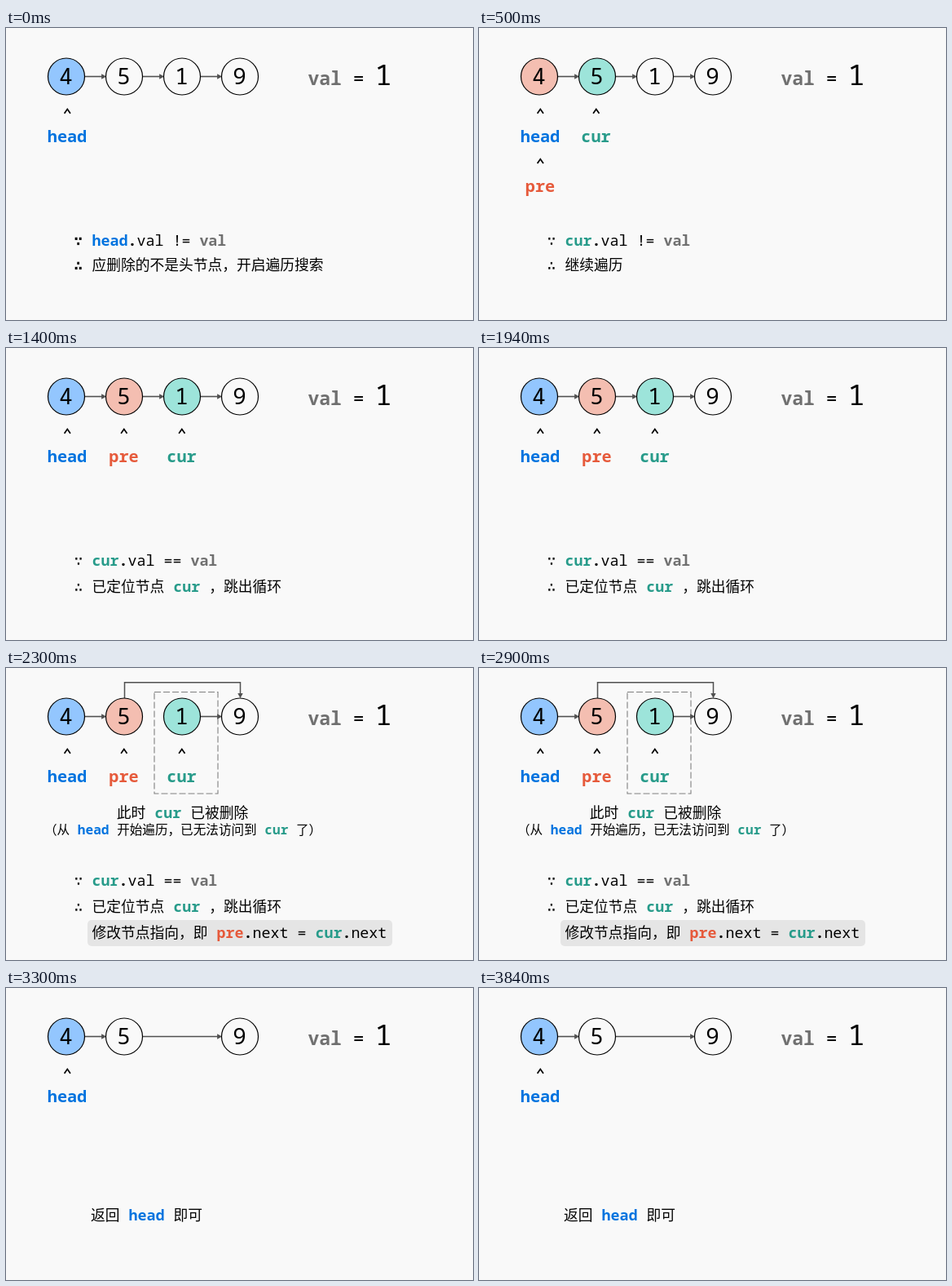
An HTML page that plays this animation: 573 px wide and 358 px high, repeating every 4200 ms.

```html
<!DOCTYPE html>
<html lang="zh-CN">
<head>
<meta charset="utf-8">
<title>链表删除节点</title>
<style>
html, body { margin: 0; width: 100%; height: 100%; overflow: hidden; background: #f9f9f9; }
svg { display: block; width: 100vw; height: 100vh; }
text { font-family: "Noto Sans Mono", "Noto Sans CJK SC", "Noto Sans CJK", monospace; white-space: pre; fill: #000; }
.cjk { font-family: "Noto Sans CJK SC", "Noto Sans CJK", sans-serif; font-weight: 500; }
.sign { font-family: "DejaVu Sans Mono", "DejaVu Sans", monospace; }
.strong .sign { font-weight: 700; }
.digit { font-weight: 500; }
.head, .cur, .pre, .val, .dot { font-weight: 700; }
.head { fill: #0073df; }
.cur { fill: #279b8a; }
.pre { fill: #e65a3b; }
.val { fill: #707070; }
</style>
</head>
<body>
<svg id="stage" viewBox="0 0 573 358"></svg>
<script>
const stage = document.getElementById('stage');
const BLUE = '#93c6fe', PINK = '#f4beb1', TEAL = '#9de4da', GREY = '#505050';
const X = [74, 145, 216, 287], MID = 59.5, R = 22.5;
const VALUES = [4, 5, 1, 9];

const text = (x, y, size, body, extra = '') =>
  `<text x="${x}" y="${y}" font-size="${size}" ${extra}>${body}</text>`;
const centred = (x, y, size, body, cls) =>
  text(x, y, size, body, `text-anchor="middle" class="${cls}"`);

// Latin runs are slightly larger than the Chinese; bare variable names are coloured.
function line(x, y, size, words) {
  const body = words.replace(/[\x20-\x7e]+|[^\x20-\x7e]+/g, run => {
    if (run.charCodeAt(0) > 126) return `<tspan class="cjk">${run}</tspan>`;
    const code = run.replace(/(?<!\.)\b(head|cur|pre|val)\b(\.?)/g,
      '<tspan class="$1">$1</tspan><tspan class="dot">$2</tspan>');
    return `<tspan font-size="${(size * 1.032).toFixed(2)}">${code}</tspan>`;
  });
  return text(x, y, size, body);
}

const node = (i, fill) =>
  `<circle cx="${X[i]}" cy="${MID}" r="${R}" fill="${fill}" stroke="#000" stroke-width="1.2"/>` +
  centred(X[i] - .4, 69, 27.5, VALUES[i], 'digit');

const arrow = (a, b) => {
  const tip = X[b] - R + .6;
  return `<path d="M${X[a] + R} ${MID}H${tip - 5}" stroke="${GREY}" stroke-width="1.6"/>` +
    `<path d="M${tip} ${MID}l-6 -3.2v6.4z" fill="${GREY}"/>`;
};

const caret = (x, y) =>
  `<path d="M${x - 3.7} ${y + 2.8}L${x} ${y - 2.6}L${x + 3.7} ${y + 2.8}" fill="none" stroke="#000" stroke-width="1.7"/>`;

const label = (x, name, y = 140) =>
  caret(x + .3, y - 38) + centred(x, y, 20.2, name, name);

const because = words =>
  centred(89, 267, 18, '∵', 'sign') + line(105.5, 267, 17.75, words);
const therefore = (words, y) =>
  centred(89, y, 18, '∴', 'sign') + line(105.5, y, 17.75, words);

const list = (fills, links) =>
  links.map(l => arrow(...l)).join('') +
  fills.map((f, i) => f === null ? '' : node(i, f)).join('');

const chain = [[0, 1], [1, 2], [2, 3]];
const target = text(370.5, 70, 23, '<tspan class="val">val</tspan> =') + centred(463, 70, 35, '1', 'digit');
const head = label(75, 'head');
const found = list([BLUE, PINK, TEAL, 'none'], []) + head +
  label(144.5, 'pre') + label(215.5, 'cur') +
  because('cur.val == val') + therefore('已定位节点 cur ，跳出循环', 299);

const bypass =
  '<rect x="182" y="29.5" width="78" height="124.5" fill="none" stroke="#808080" stroke-width="1.1" stroke-dasharray="8 3"/>' +
  `<path d="M145.5 37V17.8H287.5V32" fill="none" stroke="${GREY}" stroke-width="1.5"/>` +
  `<path d="M287.5 37l-3.2 -6h6.4z" fill="${GREY}"/>`;

const scenes = [
  [500, list([BLUE, 'none', 'none', 'none'], chain) + head + '<g class="strong">' +
    because('head.val != val') + therefore('应删除的不是头节点，开启遍历搜索', 297) + '</g>'],
  [1400, list([PINK, TEAL, 'none', 'none'], chain) + head +
    label(143.5, 'cur') + label(75, 'pre', 201.3) +
    because('cur.val != val') + therefore('继续遍历', 297)],
  [2300, list([], chain) + found],
  [3300, bypass + list([], [[0, 1], [2, 3]]) +
    '<rect x="100" y="309" width="374" height="32" rx="5" fill="#e5e5e5"/>' + found +
    line(135.7, 184, 17.75, '此时 cur 已被删除') +
    line(47, 203.5, 15.6, '（从 head 开始遍历，已无法访问到 cur 了）') +
    line(105.5, 331, 17.75, '修改节点指向，即 pre.next = cur.next')],
  [4200, list([BLUE, 'none', null, 'none'], [[0, 1], [1, 3]]) + head +
    line(104, 285, 17.75, '返回 head 即可')]
];

let shown;
function draw(ms) {
  const t = ms % 4200;
  const scene = scenes.find(([end]) => t < end);
  if (scene === shown) return;
  shown = scene;
  stage.innerHTML = target + scene[1];
}

const start = performance.now();
function tick() {
  draw(performance.now() - start);
  requestAnimationFrame(tick);
}
tick();
</script>
</body>
</html>
```
